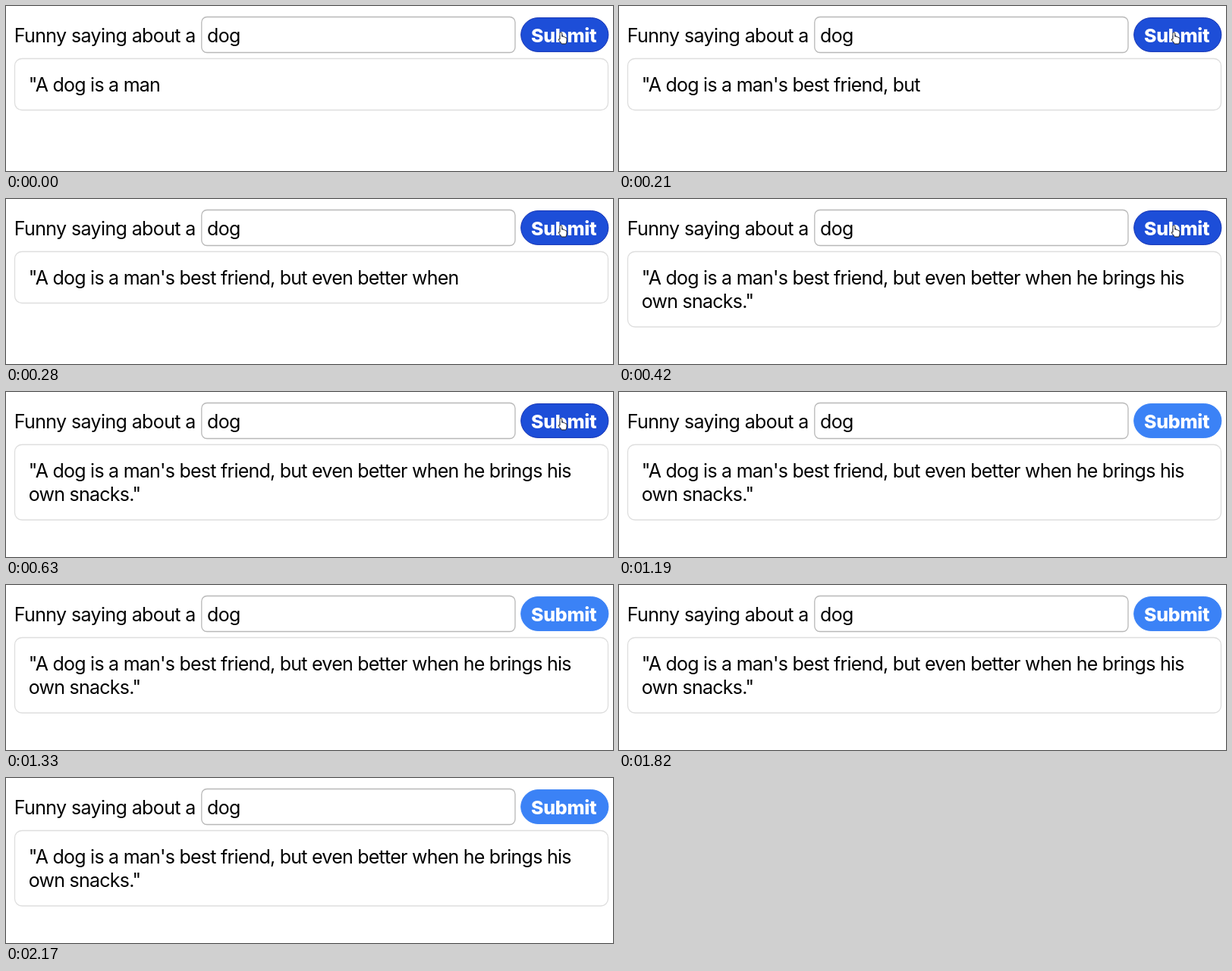
Write an HTML page that moves like this. It is 800x218 px and loops after 2.24 s.

```html
<!DOCTYPE html>
<html lang="en">
<head>
<meta charset="utf-8">
<title>Funny saying</title>
<style>
  html, body { margin: 0; width: 100%; height: 100%; overflow: hidden; background: #fff; }
  svg { display: block; width: 800px; height: 218px; }
  text {
    font: 400 25px Inter, "Liberation Sans", sans-serif;
    font-optical-sizing: none;
    letter-spacing: -.76px;
    fill: #000;
    white-space: pre;
  }
  .label { letter-spacing: -.62px; }
  .action { font-weight: 800; letter-spacing: -.3px; fill: #fff; }
  .frame { fill: #fff; stroke-width: 1.3; }
</style>
</head>
<body>
<svg viewBox="0 0 800 218">
  <text class="label" x="10.7" y="47.5">Funny saying about a</text>
  <rect class="frame" x="257.8" y="14.5" width="413.2" height="47" rx="7" stroke="#b8b8b8"/>
  <text class="label" x="265" y="47.5">dog</text>

  <rect id="button" x="678.7" y="15.6" width="115.2" height="44.8" rx="22.4"/>
  <text class="action" x="692" y="47.5">Submit</text>
  <path id="hand" fill="#fff" stroke="#222" stroke-linejoin="round"
    d="M730 44V36.3q0-1.5 1.4-1.5t1.4 1.5v4q1.7-.8 2.2.5 1.6-.5 2 .8 2-.3 2 1.5v2.6q0 2-1.2 4.3h-5.6q-1.2-2.4-3.8-5-1-1.8 1.6-1z"/>

  <rect id="card" class="frame" x="11.5" y="69.5" width="782" rx="9.5" stroke="#dedede"/>
  <text id="line1" x="29.8" y="113"></text>
  <text id="line2" x="29.8" y="144.3"></text>
</svg>
<script>
  const LOOP = 2240, STEP = 70, LEAVE = 1190;
  const first = `"A dog is a man's best friend, but even better when he brings his`;
  const second = 'own snacks."';
  const stops = ['man', 'best', 'friend,', 'but', 'when', 'his'];
  const $ = id => document.getElementById(id);

  function draw() {
    const t = performance.now() % LOOP;
    const stop = stops[Math.floor(t / STEP)];
    const hover = t < LEAVE;

    $('line1').textContent = stop ? first.slice(0, first.lastIndexOf(stop) + stop.length) : first;
    $('line2').textContent = stop ? '' : second;
    $('card').setAttribute('height', stop ? 68 : 99.5);
    $('button').setAttribute('fill', hover ? '#1d4ed8' : '#3b82f6');
    $('button').setAttribute('stroke', hover ? '#1433b4' : '#3b82f6');
    $('hand').setAttribute('visibility', hover ? 'visible' : 'hidden');
    requestAnimationFrame(draw);
  }
  draw();
</script>
</body>
</html>
```
